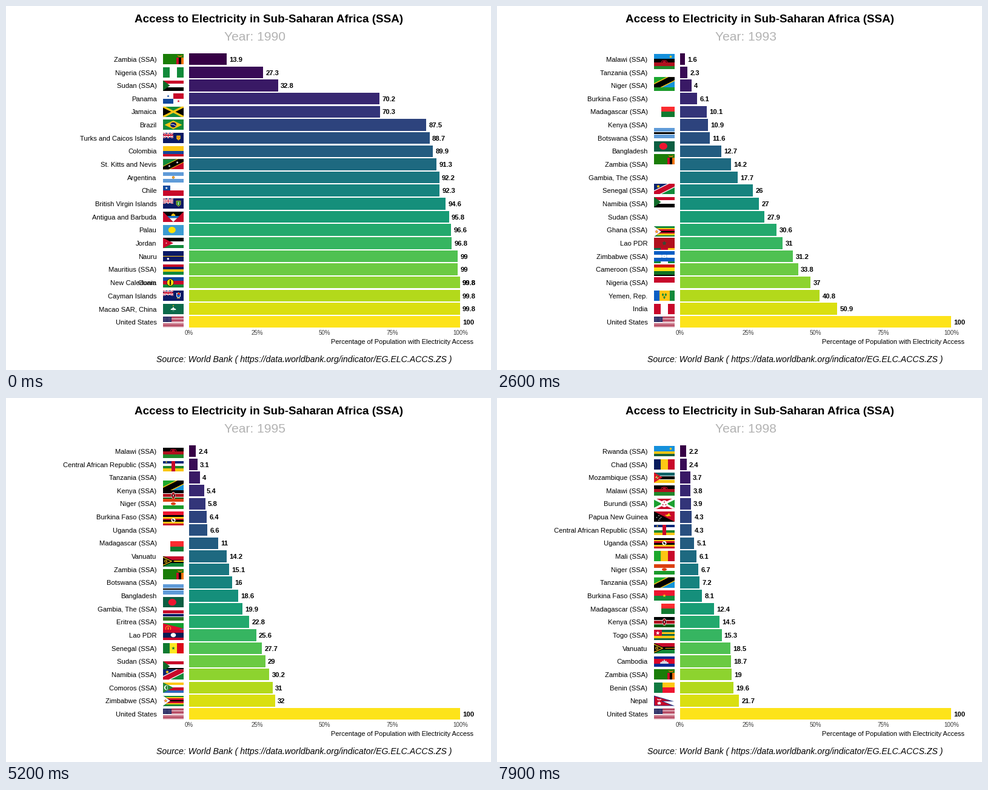
Write a matplotlib script that moves like this. It is 800 px wide and 600 px high and loops after 8 s.

```python
import numpy as np
import matplotlib.pyplot as plt
from matplotlib.animation import FuncAnimation
from matplotlib.collections import PolyCollection
from matplotlib.patches import Rectangle
from matplotlib.transforms import Affine2D

DPI = 100
FIRST_YEAR = 1990
X0, X_UNIT = 302.1, 4.473        # bar origin and pixels per percent
Y0, ROW = 87.7, 21.65            # first row centre and row pitch
BASELINE = 4.2                   # row centre to text baseline
FLAG_X, FW, FH = 259, 34, 17     # flag position and size

# One line per year, sorted by value; "*" marks SSA, "=" shares the row above.
YEARS = [
    "Zambia* 13.9; Nigeria* 27.3; Sudan* 32.8; Panama 70.2; Jamaica 70.3; Brazil 87.5; "
    "Turks and Caicos Islands 88.7; Colombia 89.9; St. Kitts and Nevis 91.3; Argentina 92.2; "
    "Chile 92.3; British Virgin Islands 94.6; Antigua and Barbuda 95.8; Palau 96.6; Jordan 96.8; "
    "Nauru 99; Mauritius* 99; Guam 99.8; =New Caledonia 99.8; Cayman Islands 99.8; "
    "Macao SAR, China 99.8",
    "Uganda* 5.6; Botswana* 10.1; Zambia* 12.8; Bangladesh 14.3; Sudan* 26.9; Cameroon* 29; "
    "Nigeria* 35.2; Indonesia 48.9; Honduras 54.8; St. Vincent and the Grenadines 66.8; Belize 67; "
    "El Salvador 69.6; Panama 73.4; Jamaica 77.2; Dominican Republic 78.2; Samoa 78.8; Brazil 90.6; "
    "Turks and Caicos Islands 91.1; St. Kitts and Nevis 91.7; Colombia 91.8",
    "Rwanda* 2.1; Malawi* 3.3; Niger* 4.7; Tanzania* 6.5; Madagascar* 9.2; Botswana* 9.4; "
    "Bangladesh 9.9; Zambia* 19.4; Namibia* 26.4; Sudan* 27.2; Zimbabwe* 28.3; Cameroon* 32.6; "
    "Nigeria* 36.4; Yemen, Rep. 43.9; Morocco 49.2; Honduras 58.9; Bolivia 59.9; Indonesia 66.6; "
    "St. Vincent and the Grenadines 69.2; Peru 69.8",
    "Malawi* 1.6; Tanzania* 2.3; Niger* 4; Burkina Faso* 6.1; Madagascar* 10.1; Kenya* 10.9; "
    "Botswana* 11.6; Bangladesh 12.7; Zambia* 14.2; Gambia, The* 17.7; Senegal* 26; Namibia* 27; "
    "Sudan* 27.9; Ghana* 30.6; Lao PDR 31; Zimbabwe* 31.2; Cameroon* 33.8; Nigeria* 37; "
    "Yemen, Rep. 40.8; India 50.9",
    "Uganda* 0.5; Malawi* 2; Tanzania* 3.3; Kenya* 3.5; Niger* 4.6; Burkina Faso* 6.1; "
    "Madagascar* 10.6; Botswana* 13.9; Zambia* 14.9; Bangladesh 17.8; Vanuatu 18; "
    "Gambia, The* 18.3; Lao PDR 25.6; Senegal* 27.2; Zimbabwe* 28.1; Sudan* 28.4; Namibia* 28.9; "
    "Ghana* 30.4; Cameroon* 35; Cote d'Ivoire* 36.5",
    "Malawi* 2.4; Central African Republic* 3.1; Tanzania* 4; Kenya* 5.4; Niger* 5.8; "
    "Burkina Faso* 6.4; Uganda* 6.6; Madagascar* 11; Vanuatu 14.2; Zambia* 15.1; Botswana* 16; "
    "Bangladesh 18.6; Gambia, The* 19.9; Eritrea* 22.8; Lao PDR 25.6; Senegal* 27.7; Sudan* 29; "
    "Namibia* 30.2; Comoros* 31; Zimbabwe* 32",
    "Uganda* 2.8; Malawi* 2.9; Central African Republic* 3.3; Mali* 6.2; Niger* 7; "
    "Burkina Faso* 7.1; Kenya* 7.4; Tanzania* 9.4; Papua New Guinea 11; Madagascar* 11.5; "
    "Benin* 14.5; Vanuatu 14.8; Zambia* 17.3; Nepal 17.9; Botswana* 18.4; Bangladesh 21.1; "
    "Gambia, The* 21.6; Eritrea* 24.8; Comoros* 28.9; Sudan* 29.4",
    "Rwanda* 1; Papua New Guinea 2.2; Chad* 2.3; Malawi* 3.4; Central African Republic* 3.8; "
    "Uganda* 3.9; Mali* 4.3; Tanzania* 6.2; Niger* 6.2; Mozambique* 6.6; Burkina Faso* 7.6; "
    "Kenya* 9.3; Madagascar* 10.9; Vanuatu 16.6; Zambia* 17.1; Nepal 18.1; Benin* 18.6; "
    "Botswana* 20.6; Bangladesh 22.4; Gambia, The* 23.3",
    "Rwanda* 2.2; Chad* 2.4; Mozambique* 3.7; Malawi* 3.8; Burundi* 3.9; Papua New Guinea 4.3; "
    "Central African Republic* 4.3; Uganda* 5.1; Mali* 6.1; Niger* 6.7; Tanzania* 7.2; "
    "Burkina Faso* 8.1; Madagascar* 12.4; Kenya* 14.5; Togo* 15.3; Vanuatu 18.5; Cambodia 18.7; "
    "Zambia* 19; Benin* 19.6; Nepal 21.7",
]


def parse(line):
    rows, row = [], -1
    for item in (line + "; United States 100").split("; "):
        name, value = item.rsplit(" ", 1)
        row += not name.startswith("=")
        rows.append((name.lstrip("="), value, row))
    return rows


STATES = [parse(line) for line in YEARS]

# Flag pieces: lists of (colour, points) in a 34 x 17 box, y downwards.
PAL = dict(k="#000000", w="#ffffff", r="#c8082a", R="#ee1530", g="#128a3a", G="#0c6040",
           y="#fdc714", b="#12489c", n="#0a1a66", s="#5f9bd8", S="#1590dc", o="#f0740c",
           O="#dc4010", m="#b0101e", t="#0c6468", d="#2c7420", B="#0a5ec4")


def poly(c, *pts):
    return [(PAL.get(c, c), pts)]


def box(c, x0=0, y0=0, x1=FW, y1=FH):
    return poly(c, (x0, y0), (x1, y0), (x1, y1), (x0, y1))


def edges(colors, weights, size):
    w = np.array(weights or [1] * len(colors), float)
    return size * (np.cumsum(w) - w) / w.sum()


def h(colors, weights=None):
    return sum((box(c, y0=y) for c, y in zip(colors, edges(colors, weights, FH))), [])


def v(colors, weights=None):
    return sum((box(c, x0=x) for c, x in zip(colors, edges(colors, weights, FW))), [])


def disc(c, x, y, rx, ry=None):
    a = np.linspace(0, 2 * np.pi, 28)
    return poly(c, *zip(x + rx * np.cos(a), y + (ry or rx) * np.sin(a)))


def star(c, x, y, r):
    a = np.arange(10) * np.pi / 5
    q = r * np.where(np.arange(10) % 2, 0.4, 1)
    return poly(c, *zip(x + q * np.sin(a), y - q * np.cos(a)))


def hoist(c, x):
    return poly(c, (0, 0), (x, FH / 2), (0, FH))


def rise(c, w):
    return poly(c, (0, FH), (0, FH - w), (FW - 2 * w, 0), (FW, 0), (FW, w), (2 * w, FH))


def fall(c, w):
    return poly(c, (0, 0), (2 * w, 0), (FW, FH - w), (FW, FH), (FW - 2 * w, FH), (0, w))


def halves(top, bottom):
    return box(bottom) + poly(top, (0, 0), (FW, 0), (0, FH))


def half_size(pieces):
    return [(c, [(x / 2, y / 2) for x, y in pts]) for c, pts in pieces]


def ensign():
    jack = (box("n") + rise("w", 3) + fall("w", 3) + rise("r", 1) + fall("r", 1)
            + box("w", 0, 5.5, FW, 11.5) + box("w", 14, 0, 20, FH)
            + box("r", 0, 6.8, FW, 10.2) + box("r", 15.3, 0, 18.7, FH))
    return box("n") + half_size(jack)


def shield(c, x=25.5, y=8.5, r=4):
    return poly(c, (x - r * .8, y - r), (x + r * .8, y - r), (x + r * .8, y + r * .3),
                (x, y + r), (x - r * .8, y + r * .3))


def spots(c, pts, r):
    return sum((disc(c, x, y, r) for x, y in pts), [])


def diamond(c, x, y, rx, ry):
    return poly(c, (x - rx, y), (x, y - ry), (x + rx, y), (x, y + ry))


US_STARS = [(1.3 + 1.15 * i, 1 + 0.9 * j) for j in range(9) for i in range(11) if (i + j) % 2 == 0]

FLAGS = {
    "Zambia": box("#1a7d08") + box("r", 22, 6, 26) + box("k", 26, 6, 30) + box("o", 30, 6)
        + poly("o", (23, 2), (28, 3), (33, 2), (30, 4.5), (26, 4.5)),
    "Nigeria": v("gwg"),
    "Sudan": h("rwk") + hoist("#0f6a28", 11.5),
    "Panama": box("w") + box("r", 17, 0, FW, 8.5) + box("b", 0, 8.5, 17)
        + star("b", 8.5, 4.4, 2.3) + star("r", 25.5, 12.8, 2.3),
    "Jamaica": box("g") + hoist("k", 17) + poly("k", (FW, 0), (17, 8.5), (FW, FH))
        + rise("y", 1.8) + fall("y", 1.8),
    "Brazil": box("g") + diamond("y", 17, 8.5, 14.5, 7) + disc("n", 17, 8.5, 5, 4.3)
        + poly("w", (12.3, 7.2), (17, 7.4), (21.7, 10), (21.4, 10.8), (17, 8.4), (12.2, 8)),
    "Turks and Caicos Islands": ensign() + shield("y") + spots("O", [(24.3, 7), (26.8, 7.2), (25.5, 10)], .9),
    "Colombia": h("ybr", (2, 1, 1)),
    "St. Kitts and Nevis": halves("g", "r") + rise("y", 5.6) + rise("k", 4.5)
        + star("w", 10.5, 11.5, 2.2) + star("w", 23.5, 5.5, 2.2),
    "Argentina": h("sws") + disc("#c87828", 17, 8.5, 2.2) + disc("y", 17, 8.5, 1.1),
    "Chile": h("wr") + box("b", 0, 0, 11.5, 8.5) + star("w", 5.7, 4.4, 2.4),
    "British Virgin Islands": ensign() + shield("y", r=4.8) + shield("g", r=4)
        + box("w", 25, 6, 26.3, 11) + spots("y", [(23.6, 7), (27.6, 7), (23.9, 9)], .6),
    "Antigua and Barbuda": box("r") + poly("k", (0, 0), (FW, 0), (17, FH)) + star("y", 17, 6.4, 4.2)
        + disc("y", 17, 6.6, 3.2) + poly("#1272c6", (7, 7), (27, 7), (24, 10.5), (10, 10.5))
        + poly("w", (10.5, 10.5), (23.5, 10.5), (17, FH)),
    "Palau": box("#3c9cd2") + disc("#fde004", 14.8, 8.5, 6, 5.2),
    "Jordan": h("kwg") + hoist("r", 17) + star("w", 5.5, 8.5, 1.4),
    "Nauru": box("n") + box("y", 0, 7.8, FW, 9.2) + star("w", 8.3, 12.8, 2.3) + disc("w", 8.3, 12.8, 1.5),
    "Mauritius": h("rnyg"),
    "New Caledonia": h("brg") + disc("k", 12, 8.5, 6) + disc("#fde010", 12, 8.5, 5.4)
        + box("k", 11.6, 3.6, 12.4, 13.4) + spots("k", [(12, 6), (12, 8.7), (12, 11.3)], 1.3),
    "Cayman Islands": ensign() + shield("w", r=4.4) + shield("B", r=3.2) + box("r", 23.5, 4.5, 27.5, 6.6)
        + spots("y", [(25.5, 4), (24, 12.5), (27, 12.5)], .9),
    "Macao SAR, China": box("#0c6a4a") + disc("w", 17, 9.8, 4.4, 2) + diamond("w", 17, 8.6, 2, 3.4)
        + box("#0c6a4a", 13, 10.6, 21, 11.1) + star("y", 17, 3.4, 1.5),
    "United States": h(["#a01030", "w"] * 6 + ["#a01030"]) + box("#20225c", 0, 0, 13.7, 9.15)
        + spots("w", US_STARS, .27),
    "Uganda": h("kyrkyr") + disc("w", 17, 8.5, 3.6, 3.4)
        + poly("k", (15.5, 6), (17.4, 7.5), (19.4, 9.6), (17, 10.8), (15.4, 9)),
    "Botswana": h("swkws", (9, 1, 4, 1, 9)),
    "Bangladesh": box("#0c5e42") + disc("R", 15.3, 8.5, 6.6, 5.6),
    "Cameroon": v(["#0c6b4a", "r", "y"]) + star("y", 17, 8.5, 2.6),
    "Indonesia": h("rw"),
    "Honduras": h("BwB") + spots("B", [(13, 7), (21, 7), (17, 8.5), (13, 10), (21, 10)], .6),
    "St. Vincent and the Grenadines": v("Byg", (1, 2, 1)) + diamond("g", 14.6, 7, 1.8, 2.8)
        + diamond("g", 19.4, 7, 1.8, 2.8) + diamond("g", 17, 11.5, 1.8, 2.8),
    "Belize": h("rnr", (1, 8, 1)) + disc("w", 17, 8.5, 5.6) + disc("g", 17, 8.5, 4.8) + disc("w", 17, 8.5, 4)
        + shield("S", 17, 8.5, 2.4),
    "El Salvador": h("bwb") + disc("g", 17, 8.5, 2.4) + disc("y", 17, 8.5, 1.5),
    "Dominican Republic": box("w") + box("b", 0, 0, 14.5, 6.5) + box("r", 19.5, 0, FW, 6.5)
        + box("r", 0, 10.5, 14.5) + box("b", 19.5, 10.5),
    "Samoa": box("r") + box("n", 0, 0, 17, 8.5)
        + sum((star("w", x, y, 1.2) for x, y in [(8.5, 1.6), (5.5, 3.8), (11.5, 3.4), (10, 5), (8.5, 6.8)]), []),
    "Rwanda": h(["S", "y", "#1c6038"], (2, 1, 1)) + star("y", 27.5, 4.4, 2.6) + disc("y", 27.5, 4.4, 1.5),
    "Malawi": h(["k", "m", "#20882c"]) + disc("r", 17, 5.2, 5.5, 3.2) + disc("k", 17, 5.6, 4.5, 2.4)
        + disc("r", 17, 5.3, 2.8, 1.6) + box("m", 10, 5.67, 24, 9),
    "Niger": h(["O", "w", "#1a9a2a"]) + disc("O", 17, 8.5, 4, 2.3),
    "Tanzania": halves("#1ca82c", "#1494d8") + rise("y", 6.6) + rise("k", 5),
    "Madagascar": box("w") + box("#fc2c30", 11.5, 0, FW, 8.5) + box("#107a30", 11.5, 8.5),
    "Namibia": halves("#0c2470", "#128a3a") + rise("w", 6) + rise("r", 4.6)
        + star("y", 7, 4.4, 3) + disc("y", 7, 4.4, 1.8),
    "Zimbabwe": h("gyrkryg") + hoist("k", 13) + hoist("w", 12) + star("r", 4.3, 8.5, 3.3)
        + diamond("y", 4.3, 8.5, 1.6, 2.2),
    "Yemen, Rep.": h("rwk"),
    "Morocco": box("m") + star("G", 17, 8.7, 4) + star("m", 17, 8.7, 1.2),
    "Bolivia": h(["#d01810", "#fde010", "#107024"]),
    "Peru": v("rwr"),
    "Burkina Faso": h("Rg") + star("y", 17, 8.5, 3),
    "Kenya": h(["k", "w", "m", "w", "#0c5c10"], (5, 1, 5, 1, 5)) + disc("w", 17, 8.5, 3.4, 6)
        + disc("m", 17, 8.5, 2.6, 5.4) + diamond("k", 15, 8.5, .9, 3) + diamond("k", 19, 8.5, .9, 3)
        + diamond("w", 17, 8.5, .8, 2.2),
    "Gambia, The": h("rwnwd", (6, 1, 4, 1, 6)),
    "Senegal": v(["#107a30", "#fde820", "#dc0818"]) + star("#107a30", 17, 8.5, 3),
    "Ghana": h(["r", "y", "#0c6030"]) + star("k", 17, 8.5, 3.3),
    "Lao PDR": h(["r", "#081c54", "r"], (1, 2, 1)) + disc("w", 17, 8.5, 4.3, 3.5),
    "India": h("owg") + disc("n", 17, 8.5, 2) + disc("w", 17, 8.5, 1.4),
    "Vanuatu": h("rg") + box("k", 0, 6, FW, 11) + box("y", 0, 7.9, FW, 9.1) + hoist("k", 19)
        + poly("y", (0, 1.2), (15.5, 8.5), (0, 15.8), (0, 14.4), (12.8, 8.5), (0, 2.6))
        + disc("y", 4.6, 8.5, 2.5) + disc("k", 4.6, 8.5, 1.6) + disc("y", 4.8, 8.5, .7),
    "Cote d'Ivoire": v(["o", "w", "#109654"]),
    "Central African Republic": h(["#082878", "w", "#20882c", "y"]) + box("r", 14.3, 0, 19.7) + star("y", 5.5, 2.1, 1.8),
    "Eritrea": h(["#10a030", "#2f7fd0"]) + hoist("#e00c2c", FW) + disc("y", 8.5, 8.5, 4.6)
        + disc("#e00c2c", 8.5, 8.5, 3.8) + diamond("y", 8.5, 8.5, .9, 3.2),
    "Comoros": h(["y", "w", "r", "#2f68bc"]) + hoist("#288838", 17) + disc("w", 5.8, 8.5, 4)
        + disc("#288838", 7.3, 8.5, 3.5) + spots("w", [(7.4, 6), (7.4, 7.7), (7.4, 9.4), (7.4, 11)], .6),
    "Mali": v(["#1ca82c", "y", "r"]),
    "Papua New Guinea": box("k") + poly("r", (0, 0), (FW, 0), (FW, FH))
        + poly("y", (17.5, 5.5), (22, 4.8), (25, 1.8), (26, 5), (28.5, 7.5), (25, 7), (22, 8))
        + sum((star("w", x, y, 1.2) for x, y in [(8, 6.5), (4.5, 9.5), (11.5, 9.3), (8, 14), (9.7, 11.3)]), []),
    "Benin": h("yR") + box("#107a40", 0, 0, 13.6),
    "Nepal": box("w") + poly("#142c80", (0, 0), (33, 9.6), (15, 9.6), (FW, FH), (0, FH))
        + poly("r", (.9, 1.2), (27, 8.8), (11.5, 8.8), (29, 16.2), (.9, 16.2))
        + disc("w", 8.5, 6, 3.5, 1.6) + disc("r", 8.5, 5.1, 3, 1.2) + star("w", 8.5, 12.5, 3.6)
        + disc("w", 8.5, 12.6, 2.8, 1.9),
    "Chad": v(["#081c5c", "y", "r"]),
    "Mozambique": h("twkwy", (5, 1, 5, 1, 5)) + hoist("#d81428", 14) + star("y", 4.8, 8.5, 3.6)
        + diamond("w", 4.8, 8.8, 2, 1.3) + poly("k", (3, 10.3), (7, 6), (7.4, 6.6), (3.6, 10.9)),
    "Burundi": box("r") + hoist("#1ca030", 17) + poly("#1ca030", (FW, 0), (17, 8.5), (FW, FH))
        + rise("w", 1.9) + fall("w", 1.9) + disc("w", 17, 8.5, 5.6)
        + star("r", 17, 5.7, 1.6) + star("r", 14.6, 10.2, 1.6) + star("r", 19.4, 10.2, 1.6),
    "Togo": h(["#106848", "y"] * 2 + ["#106848"]) + box("#d00c30", 0, 0, 12.5, 10.2) + star("w", 6.2, 5.2, 3.6),
    "Cambodia": h(["#0c2c94", "#dc0428", "#0c2c94"], (1, 2, 1))
        + poly("#d8d8e0", (10, 12.4), (10.6, 9.5), (13, 9.5), (13.6, 7), (15.4, 8.6), (17, 4.8),
               (18.6, 8.6), (20.4, 7), (21, 9.5), (23.4, 9.5), (24, 12.4)),
}

fig = plt.figure(figsize=(800 / DPI, 600 / DPI), dpi=DPI, facecolor="white")
ax = fig.add_axes([0, 0, 1, 1])
ax.set_xlim(0, 800)
ax.set_ylim(600, 0)
ax.axis("off")


def text(x, y, s, px, color="k", ha="center", **kw):
    return ax.text(x, y, s, fontsize=px * 72 / DPI, color=color, ha=ha, va="baseline",
                   family="Liberation Sans", zorder=60, **kw)


def row_color(row):
    return tuple(np.array(plt.cm.viridis(row / 20)[:3]) ** 1.18)


text(434, 27, "Access to Electricity in Sub-Saharan Africa (SSA)", 18.9, weight="bold")
year_text = text(410, 57, "", 21, "#b3b3b3")
for pct in range(0, 101, 25):
    text(X0 + X_UNIT * pct, 542, f"{pct}%", 9.8, "#3e3e3e")
text(771.5, 557, "Percentage of Population with Electricity Access", 11.06, ha="right")
text(491.5, 587, "Source: World Bank ( https://data.worldbank.org/indicator/EG.ELC.ACCS.ZS )",
     14.1, style="italic")

bars = [ax.add_patch(Rectangle((X0, Y0 + ROW * (row - 0.45)), 1, ROW * 0.9, lw=0,
                               color=row_color(row), zorder=1)) for row in range(21)]
labels = [(text(248.5, 0, "", 11.3, ha="right"), text(0, 0, "", 11.3, ha="left", weight="bold"))
          for _ in range(max(map(len, STATES)))]

flags = {}
for name, pieces in FLAGS.items():
    shift = Affine2D()
    art = PolyCollection([pts for _, pts in pieces], facecolors=[c for c, _ in pieces],
                         linewidths=0, transform=shift + ax.transData)
    ax.add_collection(art, autolim=False)
    flags[name] = art, shift


def mix(a, b, p):
    return a + (b - a) * p


def draw_bars(a, b, p):
    # Bars belong to a rank, so only their lengths change.
    start, end = ({row: float(value) for _, value, row in s} for s in (a, b))
    for row, bar in enumerate(bars):
        bar.set_width(X_UNIT * mix(start[row], end[row], p))


def draw_labels(a, b, p):
    for i, (label, number) in enumerate(labels):
        alive = i < len(a) and (p < 1 or i < len(b))
        label.set_visible(alive)
        number.set_visible(alive)
        if not alive:
            continue
        start, end = a[i], b[i] if i < len(b) else a[i]
        name, value, _ = start if p < 0.5 else end
        x = X0 + X_UNIT * mix(float(start[1]), float(end[1]), p)
        y = Y0 + ROW * mix(start[2], end[2], p) + BASELINE
        label.set_text(name.replace("*", " (SSA)"))
        label.set_y(y)
        number.set_text(value)
        number.set_position((x + 4.2, y))


def draw_flags(a, b, p):
    # Leaving flags wait in place; new ones appear once the move is over.
    for art, _ in flags.values():
        art.set_visible(False)
    target = {name: row for name, _, row in b}
    for order, (name, _, row) in enumerate(b if p == 1 else a):
        key = name.rstrip("*")
        if key not in flags:
            continue
        art, shift = flags[key]
        y = Y0 + ROW * mix(row, target.get(name, row), p)
        shift.clear().translate(FLAG_X, y - FH / 2)
        art.set_visible(True)
        art.set_zorder(10 + order)


def update(frame):
    k, step = divmod(frame, 10)
    p = min(max((step - 1) / 8, 0), 1)
    a, b = STATES[k], STATES[k + 1]
    year_text.set_text(f"Year: {FIRST_YEAR + k + (p >= 0.5)}")
    draw_bars(a, b, p)
    draw_labels(a, b, p)
    draw_flags(a, b, p)


anim = FuncAnimation(fig, update, frames=80, interval=100, repeat=True, repeat_delay=0,
                     init_func=lambda: update(0))
plt.show()
```
